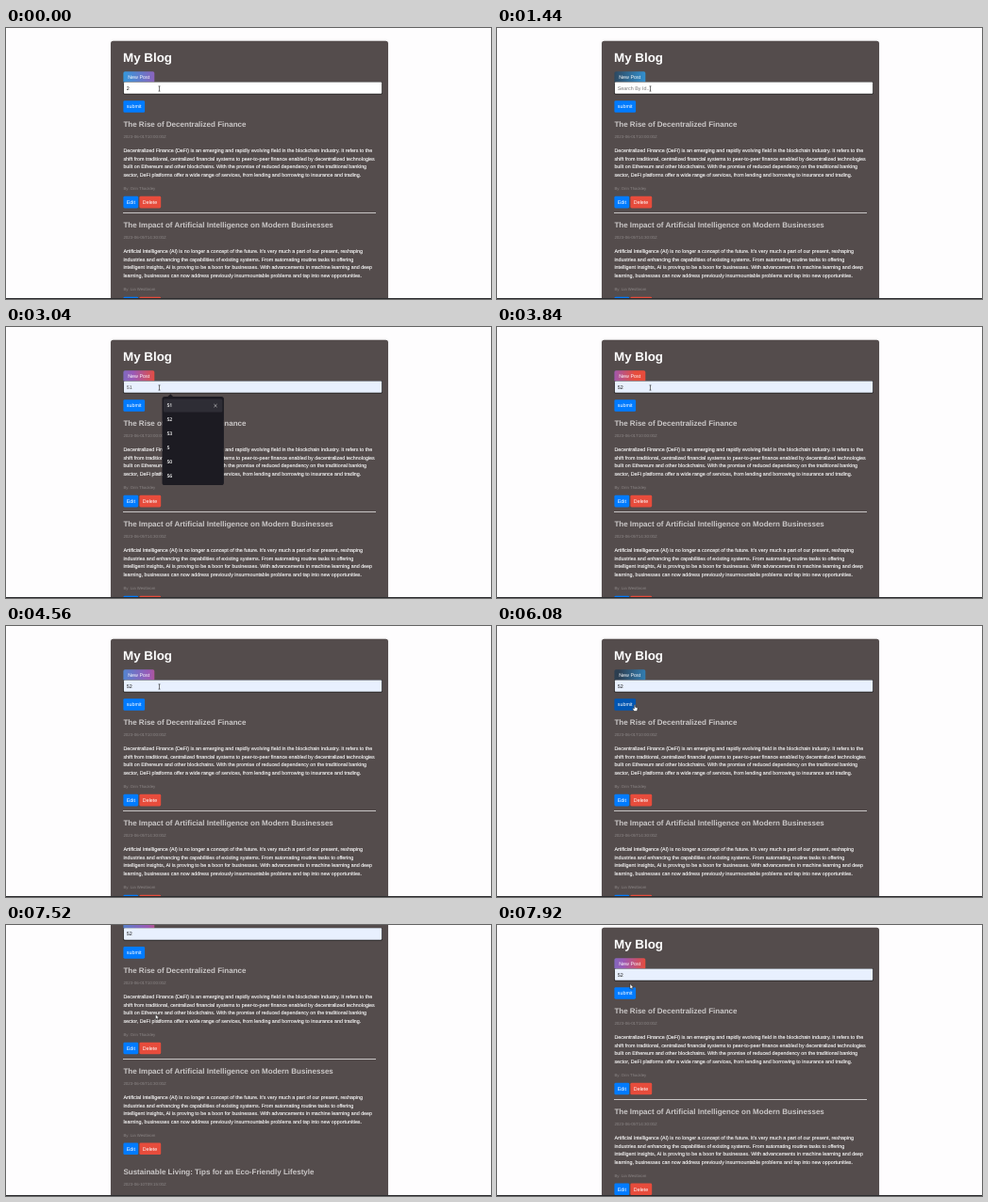
An HTML page that plays this animation: 514 by 288 pixels, repeating every 8000 ms.

```html
<!DOCTYPE html>
<html lang="en">
<head>
<meta charset="utf-8">
<title>My Blog</title>
<style>
html, body { margin: 0; width: 100%; height: 100%; overflow: hidden; background: #fefdfe; }
svg { display: block; width: 514px; height: 288px; }
text { font-family: "Liberation Sans", Arial, sans-serif; font-size: 5.36px; fill: #fff; text-rendering: geometricPrecision; white-space: pre; }
.h1 { font-size: 13.38px; font-weight: bold; }
.h2 { font-size: 8.02px; font-weight: bold; fill: #cbc8c8; }
.date { font-size: 4.45px; fill: #8c8787; }
.by { font-size: 4.3px; fill: #8c8787; }
.body { stroke: #fff; stroke-width: .1px; }
.option { font-family: "Open Sans", sans-serif; font-size: 5.2px; font-weight: 600; }
</style>
</head>
<body>
<svg id="stage" viewBox="0 0 514 288">
  <defs>
    <linearGradient id="shift" gradientUnits="userSpaceOnUse" y1="0" y2="0">
      <stop offset=".05" stop-color="#2c3e50"/>
      <stop offset=".36" stop-color="#3498db"/>
      <stop offset=".66" stop-color="#9b59b6"/>
      <stop offset=".84" stop-color="#e74c3c"/>
    </linearGradient>
    <filter id="soft" x="-10%" width="120%" y="-10%" height="120%"><feGaussianBlur stdDeviation="1.6"/></filter>
  </defs>
  <g id="page"></g>
  <g id="menu"></g>
  <g id="cursor">
    <path id="beam" d="M-1 -2.6H1M0 -2.6V2.6M-1 2.6H1" fill="none" stroke-width=".6"/>
    <path id="hand" d="M-.6 -2.6Q0 -3.3 .6 -2.6V-.3L2.6 .3Q3.2 .6 3 1.6L2.4 4H-.8L-2.3 1.4Q-2.3 .5 -1.4 .9L-.6 1.5Z" fill="#fff" stroke="#111" stroke-width=".45"/>
    <path id="arrow" d="M0 -2.5V3L1.2 1.9L2.1 3.8L3 3.4L2.2 1.6H3.8Z" fill="#fff" stroke="#111" stroke-width=".5"/>
  </g>
  <rect y="287" width="514" height="1" fill="#2b2b2e"/>
</svg>
<script>
const LOOP = 8000, LEFT = 124.4, POST_STEP = 106.85;
const $ = id => document.getElementById(id);

function add(parent, tag, attrs, content = "") {
  const el = document.createElementNS("http://www.w3.org/2000/svg", tag);
  for (const k in attrs) el.setAttribute(k, attrs[k]);
  el.textContent = content;
  return parent.appendChild(el);
}
const rect = (parent, x, y, width, height, fill, rx = 0) =>
  add(parent, "rect", { x, y, width, height, fill, rx });
const label = (parent, x, y, str, cls = "") => add(parent, "text", { x, y, class: cls }, str);

function button(x, y, w, str, fill) {
  const box = rect(page, x, y, w, 12.6, fill, 1.4);
  label(page, x + 3.4, y + 8.2, str);
  return box;
}

const posts = [
  ["The Rise of Decentralized Finance", "2023-06-01T10:00:00Z", "Orin Thackley", [
    "Decentralized Finance (DeFi) is an emerging and rapidly evolving field in the blockchain industry. It refers to the",
    "shift from traditional, centralized financial systems to peer-to-peer finance enabled by decentralized technologies",
    "built on Ethereum and other blockchains. With the promise of reduced dependency on the traditional banking",
    "sector, DeFi platforms offer a wide range of services, from lending and borrowing to insurance and trading."]],
  ["The Impact of Artificial Intelligence on Modern Businesses", "2023-06-05T14:30:00Z", "Lia Westbrom", [
    "Artificial Intelligence (AI) is no longer a concept of the future. It's very much a part of our present, reshaping",
    "industries and enhancing the capabilities of existing systems. From automating routine tasks to offering",
    "intelligent insights, AI is proving to be a boon for businesses. With advancements in machine learning and deep",
    "learning, businesses can now address previously insurmountable problems and tap into new opportunities."]],
  ["Sustainable Living: Tips for an Eco-Friendly Lifestyle", "2023-06-10T09:15:00Z", "", [
    "Sustainability is more than just a buzzword; it's a way of life. As the effects of climate change become more",
    "pronounced, there's a growing realization about the need to live sustainably. From reducing waste and",
    "conserving energy to supporting eco-friendly products, there are numerous ways we can make our daily lives",
    "more environmentally friendly. This post will explore practical tips and habits that can make a significant"]]
];

// Page
const page = $("page");
rect(page, 111, 14, 294, 420, "rgba(0,0,0,.12)", 3).setAttribute("filter", "url(#soft)");
rect(page, 111, 13.8, 294, 420, "#544c4c", 2.7);
label(page, LEFT - .4, 35.7, "My Blog", "h1");
rect(page, LEFT, 46.2, 32.9, 12.4, "url(#shift)", 1.8);
label(page, 129.2, 54.3, "New Post");
rect(page, LEFT, 57.3, 274.3, 13.3, "#1c1c1c", 1);
const input = rect(page, LEFT + .5, 57.5, 273.3, 12.3, "#fff", .8);
const value = label(page, 127.8, 65.6, "");
const submit = button(LEFT, 77.2, 22.7, "submit", "#007bff");

posts.forEach(([title, date, author, lines], i) => {
  const y = i * POST_STEP;
  label(page, LEFT, y + 105.4, title, "h2");
  label(page, LEFT, y + 117, date, "date");
  lines.forEach((line, n) => label(page, LEFT, y + 132.3 + n * 8.55, line, "body"));
  if (!author) return;
  label(page, LEFT, y + 172, "By: " + author, "by");
  button(LEFT, y + 178.8, 15.8, "Edit", "#007bff");
  button(141.4, y + 178.8, 22.8, "Delete", "#e74c3c");
  rect(page, LEFT, y + 196.2, 267.2, .5, "#c9c6c6").setAttribute("shape-rendering", "crispEdges");
});

// Suggestion list
const menu = $("menu");
add(menu, "path", { d: "M171 74.5L174.3 71.3L177.6 74.5Z", fill: "#1c1b22" });
rect(menu, 165.5, 74, 65.4, 94, "#1c1b22", 2.6);
const picked = add(menu, "g", {});
rect(picked, 167, 76.6, 62.4, 14, "#2e2d35", 1.5);
add(picked, "path", { d: "M220.4 82L223.6 85.2M223.6 82L220.4 85.2", stroke: "#ddd", "stroke-width": .6 });
["51", "52", "53", "5", "50", "56"].forEach((s, i) => label(menu, 170.4, 85.4 + i * 15, s, "option"));

// Each key is [time, ...values]
function tween(keys, t) {
  const i = keys.findIndex(k => k[0] > t);
  if (i < 0) return keys[keys.length - 1].slice(1);
  if (i === 0) return keys[0].slice(1);
  const [a, b] = [keys[i - 1], keys[i]];
  const u = (t - a[0]) / (b[0] - a[0]), e = u * u * (3 - 2 * u);
  return a.slice(1).map((v, n) => v + (b[n + 1] - v) * e);
}
const step = (keys, t) => keys.filter(k => k[0] <= t).pop();

const scrollKeys = [[6280, 0], [6880, 83.5], [7160, 83.5], [8000, 9.2]];
const mouseKeys = [[5360, 162.5, 64.5], [5800, 146, 86.5], [6200, 146, 86.5], [6640, 179.8, 137],
  [7200, 179.8, 137], [7800, 141, 65], [8000, 141, 65]];
// time, text, text colour, field colour, selected row
const fieldKeys = [
  [0, "2", "#111", "#fff"],
  [560, "Search By Id...", "#757575", "#fff"],
  [2320, "5", "#111", "#fff", -1],
  [2800, "51", "#555", "#e8f0fe", 0],
  [3360, "52", "#555", "#e8f0fe", 1],
  [3840, "52", "#111", "#e8f0fe"]
];

function draw(t) {
  // Window sliding back and forth over a gradient four times the button's width
  const phase = ((t - 1170 + 4850) % 4850) / 2425;
  const x1 = LEFT - (phase < 1 ? phase : 2 - phase) * 3 * 32.9;
  $("shift").setAttribute("x1", x1);
  $("shift").setAttribute("x2", x1 + 4 * 32.9);

  const [, str, ink, paper, row] = step(fieldKeys, t);
  value.textContent = str;
  value.style.fill = ink;
  input.setAttribute("fill", paper);
  menu.style.display = row === undefined ? "none" : "";
  picked.style.display = row >= 0 ? "" : "none";
  picked.setAttribute("transform", `translate(0 ${(row || 0) * 15})`);

  const [scroll] = tween(scrollKeys, t);
  page.setAttribute("transform", `translate(0 ${-scroll})`);

  const [mx, my] = tween(mouseKeys, t);
  const hover = t > 5620 && t < 6320;
  submit.setAttribute("fill", hover ? "#0056b3" : "#007bff");
  const kind = hover ? "hand" : t > 7480 ? "arrow" : "beam";
  for (const id of ["beam", "hand", "arrow"]) $(id).style.display = id === kind ? "" : "none";
  $("beam").setAttribute("stroke", t < 5620 ? "#222" : "#b5b0b0");
  $("cursor").setAttribute("transform", `translate(${mx} ${my})`);
}

const start = performance.now();
function frame() {
  draw((performance.now() - start) % LOOP);
  requestAnimationFrame(frame);
}
frame();
</script>
</body>
</html>
```
